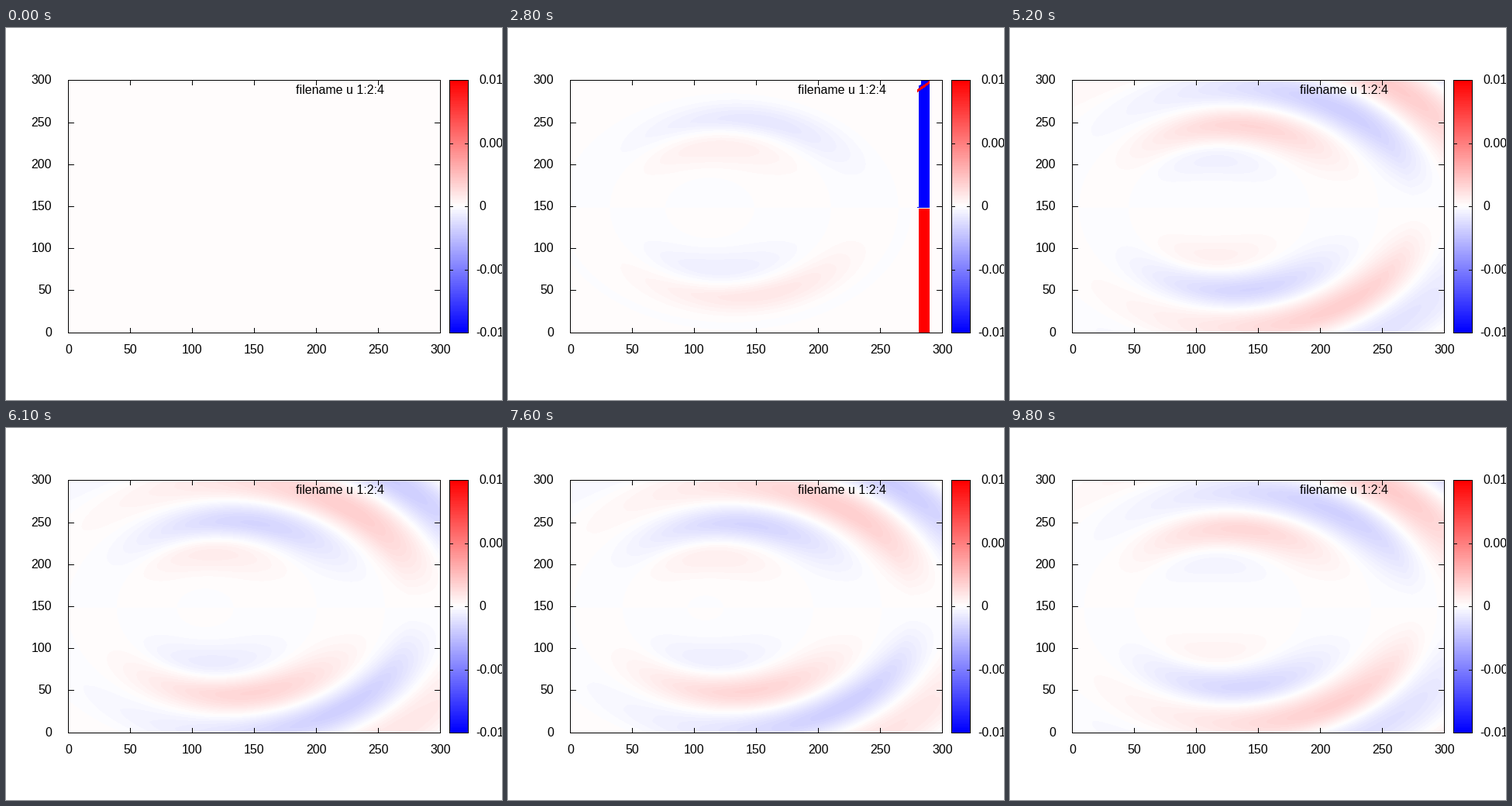
Write a matplotlib script that moves like this. It is 640x480 px and loops after 9900 ms.

```python
import numpy as np
import matplotlib.pyplot as plt
from matplotlib.animation import FuncAnimation
from matplotlib.patches import Rectangle

W, H, DPI = 640, 480, 100
FRAMES, STEP = 99, 100
LEFT, RIGHT, TOP, BOTTOM = 80, 560, 67, 393
PERIOD = 15.62            # wave period in frames
START = 24                # first frame with a visible field
SRC_X, SRC_Y, MACH = 107, 148, 0.16

plt.rcParams["font.family"] = "Liberation Sans"
fig = plt.figure(figsize=(W / DPI, H / DPI), dpi=DPI, facecolor="white")
ax = fig.add_axes([0, 0, 1, 1])
ax.axis("off")


def palette(v):
    """Blue-white-red in 128 steps for v in -1..1."""
    g = np.clip(np.floor((v + 1) * 64), 0, 127) / 127
    low, high = np.clip(2 * g, 0, 1), np.clip(2 - 2 * g, 0, 1)
    return np.stack([low, np.minimum(low, high), high], axis=-1)


def box(x, y, w, h):
    ax.add_patch(Rectangle((x, y), w, h, fc="black", lw=0,
                           antialiased=False, zorder=3))


def frame(x0, y0, x1, y1):
    for y in (y0, y1):
        box(x0, y, x1 - x0 + 1, 1)
    for x in (x0, x1):
        box(x, y0, 1, y1 - y0 + 1)


def label(x, y, s, ha="left"):
    ax.text(x, y, s, ha=ha, va="baseline", fontsize=16 * 72 / DPI,
            color="black", zorder=4, clip_on=True)


# Pixel grid of the plot area in data units
cols = np.arange(LEFT + 1, RIGHT)
rows = np.arange(TOP + 1, BOTTOM)
px, py = np.meshgrid(cols, rows)
dx = (px + 0.5 - LEFT) / 1.6 - SRC_X
dy = (BOTTOM - py - 0.5) * 300 / (BOTTOM - TOP) - SRC_Y

# Radius of the rings, whose centre drifts downstream as they grow
m2 = 1 - MACH ** 2
r = (-dx * MACH + np.sqrt((dx * MACH) ** 2 + m2 * (dx ** 2 + dy ** 2))) / m2
r = np.maximum(r, 1e-6)
cos_t = (dx - MACH * r) / r
sin_t = np.abs(dy) / r

phase = (108.6 - np.sqrt(r ** 2 + 1600)) / 44
radial = np.interp(r, [0, 25, 40, 60, 78, 100, 125, 146, 190, 230],
                   [0, .01, .03, .07, .125, .15, .12, .105, .11, .09])
lean = np.clip((r - 70) / 50, 0, 1.5)
power = np.clip(2.5 - (r - 100) / 45, 1.5, 2.5)
amp = radial * sin_t ** power * np.exp(lean * cos_t)
amp *= np.where(dy < 0, 1 - 0.5 * np.clip((r - 150) / 40, 0, 1), 1)
amp *= -np.sign(dy)


def add_shock(v, n):
    """Saturated bar that runs out through the right edge."""
    x1 = 544 + 16 * (n - 28)
    x0 = x1 - 14 * min(n - 22, 6) / 6
    bar = (px >= x0) & (px < x1)
    v[bar] = np.where(py[bar] < 232, -1, 1)
    v[bar & (py == 232)] = 0
    slope = py - 79 + (px - x0) * 0.7
    v[bar & (slope < -5) & (px < x0 + 3)] = 0
    v[(px >= x0 - 2) & (px < x1) & (np.abs(slope) < 2)] = 1
    edge = (px >= x0 - 2) & (px < x1) & (py == 231)
    v[edge] = -1


def field(n):
    if n < START:
        return np.zeros_like(r)
    age = n - 28
    s = 2 * (n - 76) / PERIOD + 0.4 * np.clip(1 - age / 12, 0, 1)
    gain = 0.65 * (n - 23) / 5 if age < 0 else min(1, 0.65 + age * 0.03)
    front = np.clip((145 + 6 * age - r) / 40, 0, 1)
    v = gain * front * amp * np.cos(np.pi * (phase + s))
    if n < 31:
        add_shock(v, n)
    return v


image = ax.imshow(palette(field(0)), extent=(LEFT + 1, RIGHT, BOTTOM, TOP + 1),
                  interpolation="nearest", aspect="auto", zorder=1)

# Colour bar
ramp = palette(np.linspace(1, -1, BOTTOM - TOP))[:, None]
ax.imshow(ramp, extent=(572, 597, BOTTOM, TOP), interpolation="nearest",
          aspect="auto", zorder=1)
frame(572, TOP, 596, BOTTOM)
for y, s in ((67, " 0.01"), (149, " 0.005"), (230, " 0"),
             (312, "-0.005"), (393, "-0.01")):
    box(572, y, 5, 1)
    box(592, y, 5, 1)
    label(606 if s[0] == "-" else 610, y + 5, s.strip())

# Axes
frame(LEFT, TOP, RIGHT, BOTTOM)
for k in range(7):
    x = LEFT + 80 * k
    y = {0: BOTTOM, 6: TOP}.get(k, 392 - 54 * k)
    box(x, TOP, 1, 7)
    box(x, BOTTOM - 6, 1, 7)
    box(LEFT, y, 8, 1)
    box(RIGHT - 7, y, 8, 1)
    label(x + 0.5, 420, str(50 * k), "center")
    label(59, y + 5, str(50 * k), "right")
label(488, 85, "filename u 1:2:4", "right")

ax.set_xlim(0, W)
ax.set_ylim(H, 0)


def update(n):
    image.set_data(palette(field(n)))
    return [image]


anim = FuncAnimation(fig, update, frames=FRAMES, interval=STEP,
                     repeat=True, repeat_delay=0, blit=False)
plt.show()
```
